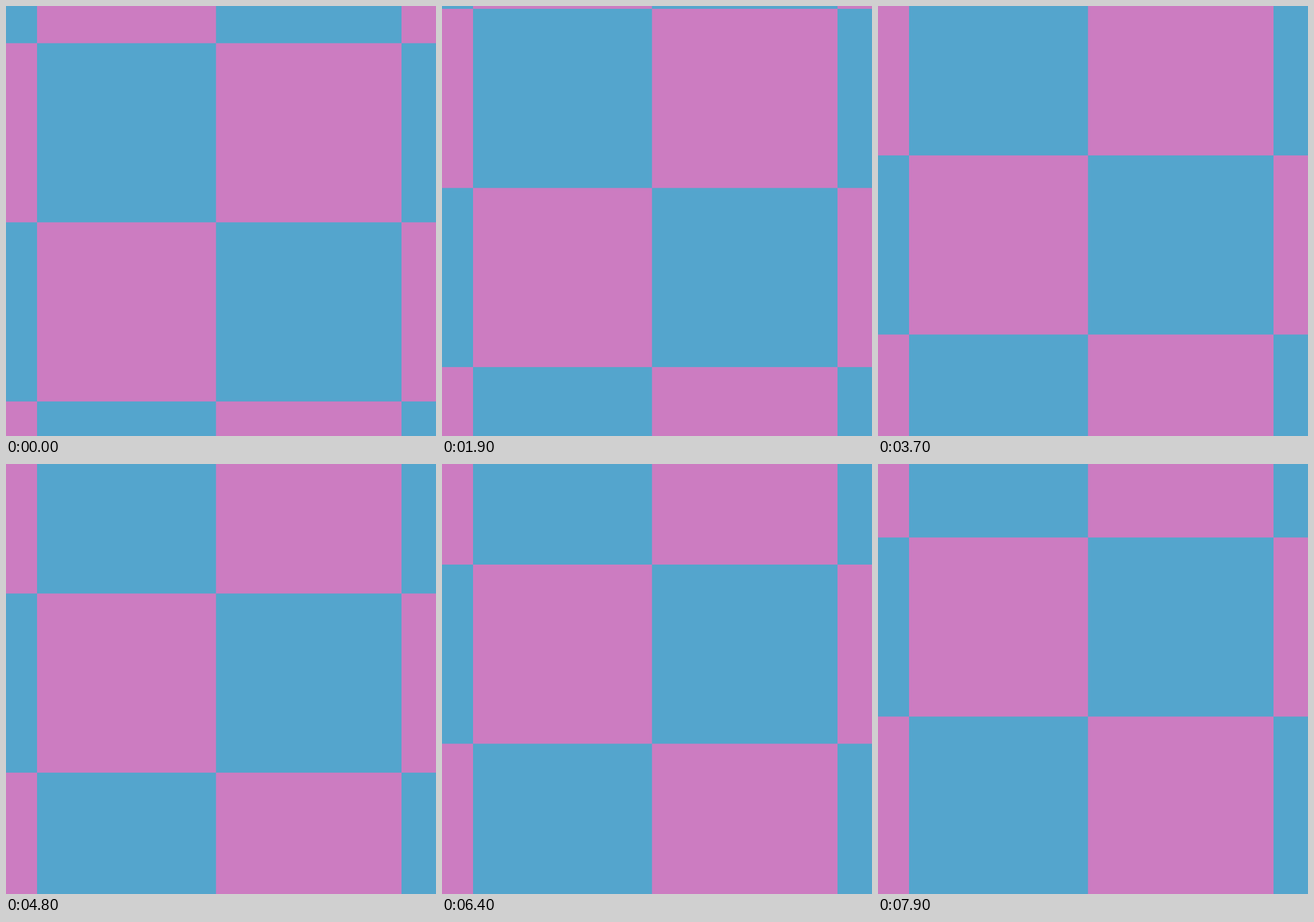
Write an HTML page with a canvas that moves like this. It is 748 by 748 pixels and loops after 8 s.

```html
<!DOCTYPE html>
<html lang="en">
<head>
<meta charset="utf-8">
<title>Scrolling checkerboard</title>
<style>
html, body { margin: 0; width: 100%; height: 100%; overflow: hidden; background: #cc7cc1; }
canvas { display: block; width: 748px; height: 748px; }
</style>
</head>
<body>
<canvas id="stage" width="748" height="748"></canvas>
<script>
const SIZE = 748, LOOP = 8000, STEP = 100;
const BLUE = '#54a5cd', PINK = '#cc7cc1';
const columns = [0, 54, 365.3, 688, SIZE];
const rowHeight = 311.6, firstRow = 64.7, speed = 3.146;
const ctx = document.getElementById('stage').getContext('2d');

function draw(time) {
  const tick = Math.floor((time % LOOP) / STEP);
  const top = firstRow - speed * tick;
  ctx.fillStyle = PINK;
  ctx.fillRect(0, 0, SIZE, SIZE);
  ctx.fillStyle = BLUE;
  for (let row = 0; row < 5; row++) {
    const y = top + (row - 1) * rowHeight;
    for (let col = row % 2; col < 4; col += 2) {
      ctx.fillRect(columns[col], y, columns[col + 1] - columns[col], rowHeight);
    }
  }
}

const start = performance.now();
function frame() {
  draw(performance.now() - start);
  requestAnimationFrame(frame);
}
frame();
</script>
</body>
</html>
```
